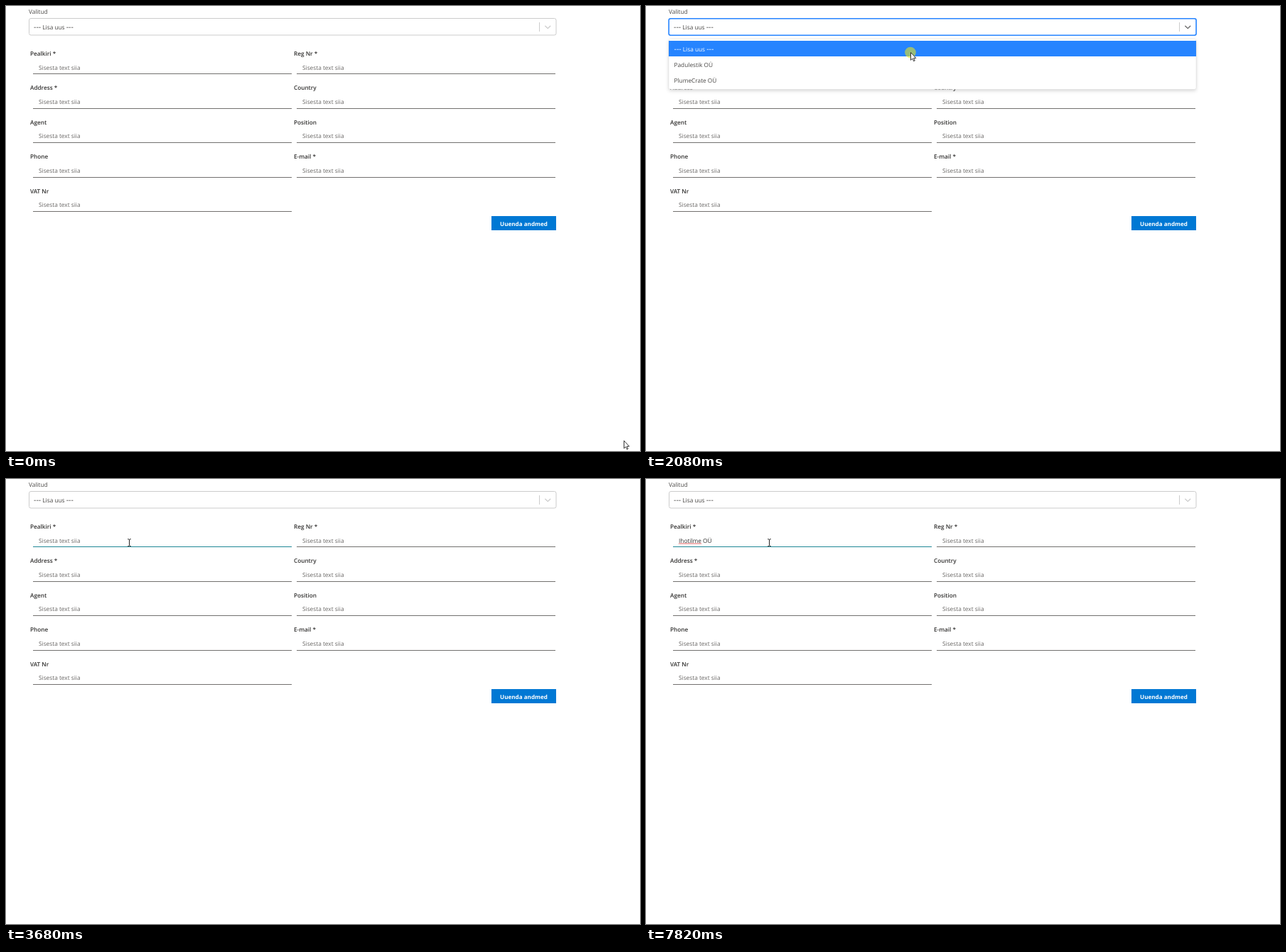
Recreate the animation shown at these times as an HTML page. Size 892 by 627 pixels, loop 8000 ms.

```html
<!DOCTYPE html>
<html lang="et">
<head>
<meta charset="utf-8">
<title>Vorm</title>
<style>
html, body { margin: 0; width: 100%; height: 100%; overflow: hidden; background: #fff; }
svg { display: block; }
text { font: 8.3px "Open Sans", "Noto Sans", sans-serif; fill: #484644; text-rendering: geometricPrecision; white-space: pre; }
.label { font-size: 8.2px; font-weight: 600; fill: #323130; }
.hint { fill: #686664; }
.dash { font-size: 10.5px; }
.line { fill: #72706e; shape-rendering: crispEdges; }
#menu { filter: drop-shadow(0 2px 2.5px rgba(0, 0, 0, .16)); }
</style>
</head>
<body>
<svg width="892" height="627" viewBox="0 0 892 627">
  <text x="32" y="10.6">Valitud</text>
  <rect id="box" fill="#fff" rx="2.5"/>
  <text x="39" y="33.4"><tspan class="dash">---</tspan> Lisa uus <tspan class="dash">---</tspan></text>
  <rect x="750" y="23" width="1" height="13" fill="#ccc"/>
  <path id="chevron" d="M758.8 28.2l3.5 3.4 3.5-3.4" fill="none" stroke-width="1.3" stroke-linecap="round" stroke-linejoin="round"/>

  <g id="fields"></g>

  <rect x="683" y="296" width="91" height="20" fill="#0078d4"/>
  <text x="728.5" y="309.6" text-anchor="middle" style="font-size:8.1px;font-weight:700;fill:#fff">Uuenda andmed</text>

  <text id="typed" x="46" y="89.5" style="fill:#323130"></text>
  <path id="wave" fill="none" stroke="#e03c3c" stroke-width=".8"/>
  <rect id="caret" y="80" width="1" height="12" fill="#222" shape-rendering="crispEdges"/>

  <g id="menu">
    <rect x="32" y="46.6" width="742" height="71" rx="2.5" fill="#fff" stroke="#000" stroke-opacity=".1" stroke-width=".6"/>
    <rect x="32" y="49" width="742" height="22" fill="#2684ff"/>
    <text x="39.5" y="63.6" style="fill:#fff"><tspan class="dash">---</tspan> Lisa uus <tspan class="dash">---</tspan></text>
    <text x="39.5" y="85.7">Padulestik OÜ</text>
    <text x="39.5" y="107.7">PlumeCrate OÜ</text>
  </g>

  <circle id="click" r="7.8" fill="#fff000"/>
  <path id="arrow" d="M.5 .5V11.3L2.9 9 4.6 12.7 6.2 12 4.6 8.4H7.8Z" fill="#fff" stroke="#222" stroke-width=".9" stroke-linejoin="round"/>
  <path id="beam" d="M-2.3-4.8Q0-5 0-3.8Q0-5 2.3-4.8M0-3.8V4.2M-2.3 5.2Q0 5.4 0 4.2Q0 5.4 2.3 5.2" fill="none" stroke="#222" stroke-width="1"/>
</svg>
<script>
const LOOP = 8000;
const $ = id => document.getElementById(id);
const set = (el, attrs) => { for (const k in attrs) el.setAttribute(k, attrs[k]); };
const show = (el, on) => { el.style.display = on ? "" : "none"; };

function add(tag, attrs, text = "") {
  const el = document.createElementNS("http://www.w3.org/2000/svg", tag);
  set(el, attrs);
  el.textContent = text;
  return $("fields").appendChild(el);
}

const labels = ["Pealkiri *", "Reg Nr *", "Address *", "Country", "Agent", "Position", "Phone", "E-mail *", "VAT Nr"];
const fields = labels.map((label, i) => {
  const x = 34 + (i % 2) * 371, dy = Math.floor(i / 2) * 48.45;
  add("text", { x, y: 69.8 + dy, class: "label" }, label);
  const hint = add("text", { x: x + 12, y: 89.5 + dy, class: "hint" }, "Sisesta text siia");
  const line = add("rect", { x: x + 4, y: Math.round(95.4 + dy), width: 364, height: 1, class: "line" });
  return { hint, line };
});

// Time, x, y of the pointer
const route = [
  [70, 869, 612], [800, 392, 23], [880, 392, 24], [1140, 392, 24], [1680, 372, 65],
  [2200, 372, 65], [2680, 185, 96], [2820, 185, 96], [2940, 175.5, 90],
  [3140, 175.5, 90], [3340, 173.5, 89.5]
];
const clicks = [[1080, .7], [2080, .52], [3140, .6]];
const opened = 1140, closed = 2200, entered = 2880, focused = 3140;

// Start time and number of letters typed
const word = "Ihotilme OÜ";
const keys = [4140, 4420, 4540, 4880, 4940, 5140, 5280, 5420, 5560, 6560, 7360];
const caretSpans = [[3140, 3680], [4140, 6080], [6560, 7100], [7360, 7820]];
const within = (t, [a, b]) => t >= a && t < b;

function pointer(t) {
  const i = route.findIndex(p => p[0] > t);
  if (i === 0) return route[0].slice(1);
  if (i < 0) return route[route.length - 1].slice(1);
  const [t0, x0, y0] = route[i - 1], [t1, x1, y1] = route[i];
  const u = (t - t0) / (t1 - t0), e = u * u * (3 - 2 * u);
  return [x0 + (x1 - x0) * e, y0 + (y1 - y0) * e];
}

function drawSelect(t, y) {
  const active = within(t, [opened, focused]);
  const hover = y < 42 && t < opened;
  set($("box"), active
    ? { x: 32.1, y: 17.8, width: 742, height: 23.5, stroke: "#2684ff", "stroke-width": 1.6 }
    : { x: 32.5, y: 17.5, width: 741.5, height: 23.5, stroke: hover ? "#b3b3b3" : "#ccc", "stroke-width": 1 });
  set($("chevron"), { stroke: active ? "#666" : "#ccc" });
  show($("menu"), within(t, [opened, closed]));
}

function drawField(t) {
  const { hint, line } = fields[0];
  line.style.fill = t >= focused ? "#1f8796" : t >= entered ? "#323130" : "";
  const count = keys.filter(k => k <= t).length;
  const typed = $("typed");
  const text = word.slice(0, count);
  if (typed.textContent !== text) typed.textContent = text;
  show(hint, !count);
  show($("wave"), t >= 5620);
  show($("caret"), caretSpans.some(s => within(t, s)));
  const width = count ? typed.getComputedTextLength() : 0;
  set($("caret"), { x: Math.round(46 + width) });
  if (t >= 5620) {
    const end = typed.getSubStringLength(0, 8);
    set($("wave"), { d: "M46 91.6" + "l1 -1.1l1 1.1".repeat(Math.round(end / 2)) });
  }
}

function drawPointer(t, [x, y]) {
  const inField = t >= entered;
  show($("arrow"), !inField);
  show($("beam"), inField);
  const at = `translate(${x} ${y})`;
  set($("arrow"), { transform: at });
  set($("beam"), { transform: at });
  const hit = clicks.find(([start]) => within(t, [start, start + 200]));
  show($("click"), hit);
  if (hit) {
    const fade = Math.min(1, (start => (start + 200 - t) / 80)(hit[0]));
    set($("click"), { cx: x, cy: y + .6, opacity: hit[1] * fade });
  }
}

function frame() {
  const t = performance.now() % LOOP;
  const p = pointer(t);
  drawSelect(t, p[1]);
  drawField(t);
  drawPointer(t, p);
  requestAnimationFrame(frame);
}
frame();
</script>
</body>
</html>
```
